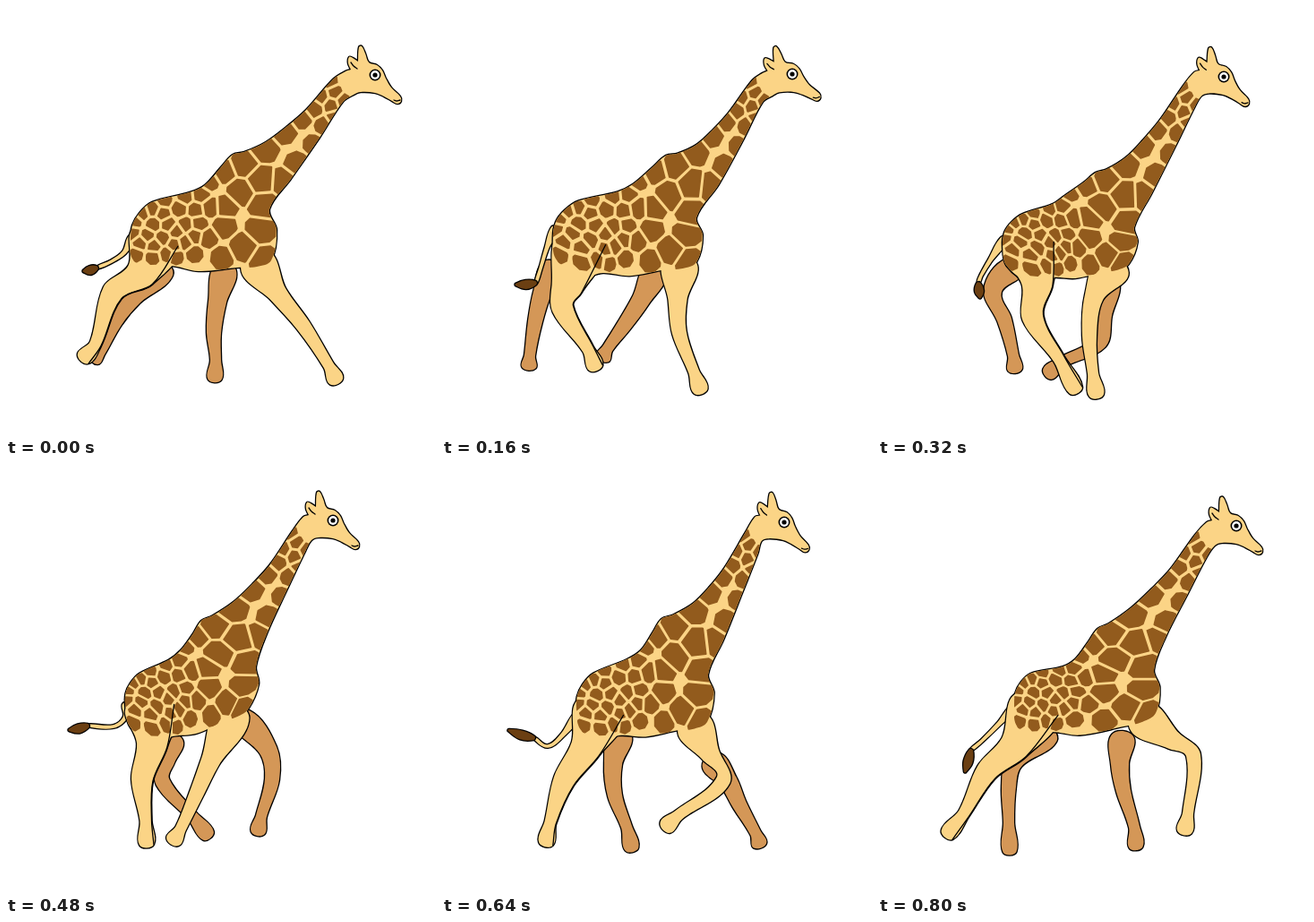
Write an HTML page with a canvas that moves like this. It is 480 px wide and 480 px high and loops after 960 ms.

```html
<!DOCTYPE html>
<html lang="en">
<head>
<meta charset="utf-8">
<title>Running giraffe</title>
<style>
  html, body { margin: 0; width: 100%; height: 100%; overflow: hidden; background: #fff; }
  canvas { display: block; width: 480px; height: 480px; }
</style>
</head>
<body>
<canvas id="stage" width="480" height="480"></canvas>
<script>
const ctx = document.getElementById('stage').getContext('2d');
const POSE_MS = 160;
const COAT = '#fbd486', FAR_COAT = '#d49757', PATCH = '#925b1d', TUFT = '#6b3f12', INK = '#000';

const points = text => text.trim().split(/\s+/).map(pair => pair.split(',').map(Number));

// Trunk and neck at rest, from nape over rump and belly to throat.
const TRUNK = points(`365,82 335,116 313,135 290,152 266,163 253,166 240,180 222,200 205,208 163,219
  149,231 141,245 139,262 141,282 160,296 183,290 215,296 258,292 280,291 296,284 302,250 294,227
  318,193 350,147 376,107`);
const HIP = [168, 258], SHOULDER = [277, 283];

// Head relative to the eye, from throat to nape; a doubled point makes a corner.
const HEAD = points(`-24,22 -16,19 0,20 10,24 19,29 25,32 29,29 28,24 18,14 12,4 8,-5 2,-11 -7,-14
  -11,-24 -15,-32 -18,-31 -19,-15 -19,-15 -25,-19 -29,-20 -30,-13 -27,-6 -27,-6 -33,-4`);
const EAR_FOLD = points('-27,-14 -24,-10 -20,-7');
const MOUTH = points('21,28 24,29 28,28');

// Half widths of the limbs at their joints.
const HIND_WIDTHS = [26, 17, 12, 6.5, 8];
const FRONT_WIDTHS = [18, 10.5, 8, 6, 8];
const FAR_WIDTHS = [12, 10, 8, 6, 7.5];
const TAIL_WIDTHS = [4, 2.4, 1.8, 1.5];

// anchors: rump, loin, withers, eye, neck front, breast, groin.
// Near legs hang from the trunk; far legs and the tail list every joint.
const POSES = [
  { tilt: 0, anchors: '139,258 222,200 253,166 412,77 294,227 296,284 183,290',
    hind: '150,300 119,320 100,377 86,394', front: '304,322 332,357 360,401 369,419',
    farHind: '178,292 142,325 122,352 105,386 97,395', farFront: '245,292 236,330 232,365 234,395 233,417',
    tail: '141,258 132,275 118,285 102,292 86,296' },
  { tilt: -5, anchors: '124,254 213,199 250,167 391,76 284,236 284,286 180,298',
    hind: '139,316 135,338 163,383 172,404', front: '263,328 265,365 281,408 289,430',
    farHind: '125,290 112,320 104,352 98,390 97,404', farFront: '240,293 222,328 203,357 185,382 179,394',
    tail: '126,248 117,270 110,293 105,309 82,311' },
  { tilt: 2, anchors: '139,264 208,212 243,186 386,79 286,247 280,288 196,303',
    hind: '178,312 173,348 202,394 221,429', front: '241,325 236,368 240,410 244,435',
    farHind: '152,290 128,318 141,350 151,390 153,407', farFront: '257,305 251,345 248,375 205,398 189,411',
    tail: '141,260 125,284 115,301 112,309 114,326' },
  { tilt: 0, anchors: '133,268 195,208 218,175 365,63 279,226 270,274 186,304',
    hind: '163,314 152,353 156,398 157,425', front: '228,332 213,367 195,407 186,422',
    farHind: '186,305 178,332 175,355 208,393 226,415', farFront: '263,283 293,320 297,352 285,393 281,412',
    tail: '134,268 133,283 120,293 92,292 70,297' },
  { tilt: 3, anchors: '150,272 222,208 245,173 382,65 297,235 296,288 198,303',
    hind: '160,318 136,354 121,400 116,424', front: '300,325 314,353 264,392 249,406',
    farHind: '200,300 191,335 193,370 206,405 212,430', farFront: '300,330 320,355 332,380 350,412 355,426',
    tail: '152,279 135,302 118,315 103,306 74,297' },
  { tilt: 0, anchors: '152,268 220,218 245,184 400,69 308,230 310,278 192,299',
    hind: '152,316 121,344 96,390 77,414', front: '330,309 352,325 346,390 342,411',
    farHind: '192,300 152,332 146,360 146,400 147,433', farFront: '273,303 270,335 274,365 286,405 288,428',
    tail: '153,270 135,290 116,309 104,319 97,344' }
];
const REST = points(POSES[0].anchors);

// Smooth curve through the points, with handles a third of each segment long.
function curve(pts, closed = false) {
  const n = pts.length, path = new Path2D();
  const at = i => closed ? pts[(i + n) % n] : pts[Math.max(0, Math.min(n - 1, i))];
  const handle = (i, reach) => {
    const [x, y] = at(i), [ax, ay] = at(i - 1), [bx, by] = at(i + 1);
    const k = reach / (Math.hypot(bx - ax, by - ay) || 1);
    return [x + (bx - ax) * k, y + (by - ay) * k];
  };
  path.moveTo(...pts[0]);
  for (let i = 0; i < (closed ? n : n - 1); i++) {
    const a = at(i), b = at(i + 1), reach = Math.hypot(b[0] - a[0], b[1] - a[1]) / 3;
    path.bezierCurveTo(...handle(i, reach), ...handle(i + 1, -reach), ...b);
  }
  if (closed) path.closePath();
  return path;
}

// One edge of a limb: its joints pushed sideways by the half widths.
function edge(joints, widths, side) {
  return joints.map(([x, y], i) => {
    const a = joints[Math.max(0, i - 1)], b = joints[Math.min(joints.length - 1, i + 1)];
    const dx = b[0] - a[0], dy = b[1] - a[1], k = side * widths[i] / Math.hypot(dx, dy);
    return [x + dy * k, y - dx * k];
  });
}

const limb = (joints, widths) =>
  curve([...edge(joints, widths, 1), ...edge(joints, widths, -1).reverse()], true);

// Moving least squares: each point follows the turn, scale and shift of the anchors near it.
function carry([x, y], anchors) {
  const weights = REST.map(([px, py]) => 1 / ((x - px) ** 2 + (y - py) ** 2 + 1));
  const total = weights.reduce((a, b) => a + b);
  const centre = pts => [0, 1].map(k => pts.reduce((sum, p, i) => sum + weights[i] * p[k], 0) / total);
  const [cx, cy] = centre(REST), [tx, ty] = centre(anchors);
  let re = 0, im = 0, norm = 0;
  REST.forEach(([px, py], i) => {
    const w = weights[i], ux = px - cx, uy = py - cy, vx = anchors[i][0] - tx, vy = anchors[i][1] - ty;
    re += w * (ux * vx + uy * vy);
    im += w * (ux * vy - uy * vx);
    norm += w * (ux * ux + uy * uy);
  });
  const dx = x - cx, dy = y - cy;
  return [tx + (dx * re - dy * im) / norm, ty + (dx * im + dy * re) / norm];
}

// Patches are large on the shoulder and shrink towards rump and head.
function scatter() {
  let state = 11;
  const random = () => (state = state * 16807 % 2147483647) / 2147483647;
  const region = curve(TRUNK, true), seeds = [];
  for (let i = 0; i < 6000; i++) {
    const x = 140 + 245 * random(), y = 80 + 205 * random();
    const r = 6 + 8 * Math.exp(-(((x - 285) / 55) ** 2));
    const clear = seeds.every(s => Math.hypot(s.x - x, s.y - y) > 0.9 * (s.r + r));
    if (clear && ctx.isPointInPath(region, x, y)) seeds.push({ x, y, r });
  }
  return seeds;
}

// Keeps the part of a polygon where nx*x + ny*y <= limit.
function cut(poly, nx, ny, limit) {
  const side = ([x, y]) => nx * x + ny * y - limit;
  return poly.flatMap((p, i) => {
    const q = poly[(i + 1) % poly.length], a = side(p), b = side(q), t = a / (a - b);
    const kept = a <= 0 ? [p] : [];
    return a * b < 0 ? [...kept, [p[0] + (q[0] - p[0]) * t, p[1] + (q[1] - p[1]) * t]] : kept;
  });
}

// A patch is an octagon trimmed against its neighbours.
function cell(seed, index, seeds) {
  let poly = Array.from({ length: 8 }, (_, k) => {
    const a = k * Math.PI / 4 + index;
    return [seed.x + 1.3 * seed.r * Math.cos(a), seed.y + 1.3 * seed.r * Math.sin(a)];
  });
  for (const other of seeds) {
    if (other === seed) continue;
    const dx = other.x - seed.x, dy = other.y - seed.y, d = Math.hypot(dx, dy);
    const nx = dx / d, ny = dy / d, reach = d * seed.r / (seed.r + other.r) - 2.4;
    poly = cut(poly, nx, ny, nx * seed.x + ny * seed.y + reach);
  }
  return poly;
}

const CELLS = scatter().map(cell);

function build(pose) {
  const anchors = points(pose.anchors), eye = anchors[3];
  const turn = pose.tilt * Math.PI / 180, c = Math.cos(turn), s = Math.sin(turn);
  const onHead = pts => pts.map(([x, y]) => [eye[0] + x * c - y * s, eye[1] + x * s + y * c]);
  const onTrunk = pts => pts.map(p => carry(p, anchors));

  const hind = [...onTrunk([HIP]), ...points(pose.hind)];
  const front = [...onTrunk([SHOULDER]), ...points(pose.front)];
  const tail = points(pose.tail), tip = tail.pop(), root = tail[tail.length - 1];
  const middle = [(root[0] + tip[0]) / 2, (root[1] + tip[1]) / 2 + 1];

  const patches = new Path2D();
  for (const poly of CELLS) {
    onTrunk(poly).forEach((p, i) => patches[i ? 'lineTo' : 'moveTo'](...p));
    patches.closePath();
  }
  const body = curve([...onTrunk(TRUNK), ...onHead(HEAD)], true);
  return {
    eye, body, patches,
    far: [pose.farHind, pose.farFront].map(leg => limb(points(leg), FAR_WIDTHS)),
    tail: limb(tail, TAIL_WIDTHS),
    tuft: limb([root, middle, tip], [2, 5, 1]),
    near: [body, limb(hind, HIND_WIDTHS), limb(front, FRONT_WIDTHS)],
    lines: [edge(hind, HIND_WIDTHS, 1), onHead(EAR_FOLD), onHead(MOUTH)].map(line => curve(line))
  };
}

function stroke(path, color, width) {
  ctx.strokeStyle = color;
  ctx.lineWidth = width;
  ctx.stroke(path);
}

function fill(path, color) {
  ctx.fillStyle = color;
  ctx.fill(path);
}

// Inks all the parts before filling them, so that they merge into one outline.
function paint(parts, color) {
  parts.forEach(part => stroke(part, INK, 2.6));
  parts.forEach(part => fill(part, color));
}

function disc([x, y], r, color) {
  const path = new Path2D();
  path.arc(x, y, r, 0, 7);
  fill(path, color);
}

function draw(g) {
  ctx.fillStyle = '#fff';
  ctx.fillRect(0, 0, 480, 480);
  paint(g.far, FAR_COAT);
  paint([g.tail], COAT);
  paint([g.tuft], TUFT);
  paint(g.near, COAT);

  ctx.save();
  ctx.clip(g.body);
  fill(g.patches, PATCH);
  stroke(g.patches, PATCH, 1.6);
  ctx.restore();
  g.lines.forEach(line => stroke(line, INK, 1.3));

  disc(g.eye, 6.5, INK);
  disc(g.eye, 4.9, '#fff');
  disc(g.eye, 2.6, INK);
}

ctx.lineJoin = ctx.lineCap = 'round';
const giraffes = POSES.map(build);
const start = performance.now();
let shown = -1;

function tick() {
  const index = Math.floor((performance.now() - start) / POSE_MS) % giraffes.length;
  if (index !== shown) draw(giraffes[shown = index]);
  requestAnimationFrame(tick);
}
tick();
</script>
</body>
</html>
```
